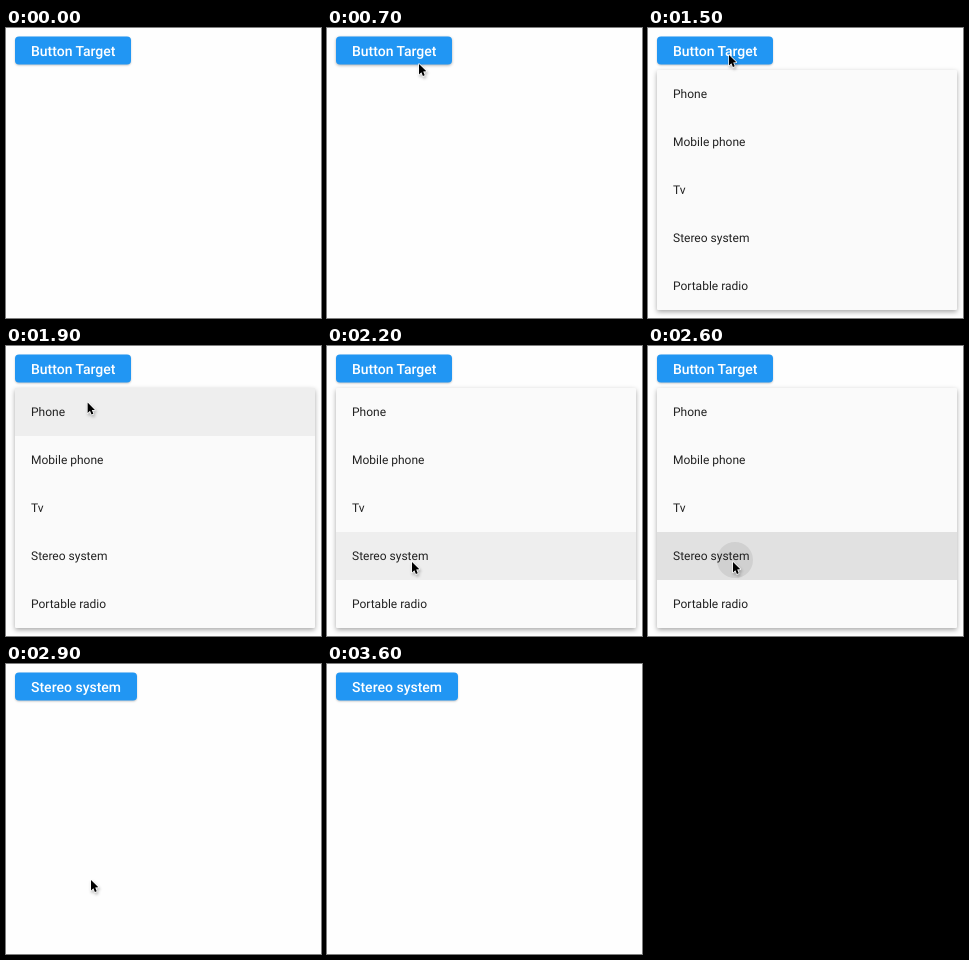
Recreate the animation shown at these times as an HTML page with a canvas. Size 315 by 290 pixels, loop 4200 ms.

```html
<!DOCTYPE html>
<html lang="en">
<head>
<meta charset="utf-8">
<title>Dropdown menu</title>
<style>
  html, body { margin: 0; width: 100%; height: 100%; overflow: hidden; background: #fefefe; }
  canvas { display: block; width: 315px; height: 290px; }
</style>
</head>
<body>
<canvas id="stage"></canvas>
<script>
const W = 315, H = 290, LOOP = 4200, STEP = 100;
const ITEMS = ['Phone', 'Mobile phone', 'Tv', 'Stereo system', 'Portable radio'];
const PICK = 3;
const PAD = 16;
const MENU = { x: 9, y: 42, w: 300, row: 48 };
const TIME = { enter: 700, open: 1500, travel: 1800, press: 2400, close: 2900, leave: 3200, gone: 3600 };
const SPOT = {
  start: { x: 92, y: 36 },
  button: { x: 81, y: 27 },
  item: { x: 85, y: 216 },
  exit: { x: 120, y: 300 }
};

const canvas = document.getElementById('stage');
const ctx = canvas.getContext('2d');
const dpr = window.devicePixelRatio || 1;
canvas.width = W * dpr;
canvas.height = H * dpr;
ctx.textRendering = 'geometricPrecision';

// Eased progress from 0 to 1 over a span of time
function progress(t, from, span) {
  const k = Math.min(1, Math.max(0, (t - from) / span));
  return k * k * (3 - 2 * k);
}

function glide(a, b, k) {
  return { x: a.x + (b.x - a.x) * k, y: a.y + (b.y - a.y) * k };
}

function cursorAt(t) {
  if (t < TIME.travel) return glide(SPOT.start, SPOT.button, progress(t, TIME.enter, 400));
  if (t < TIME.leave) return glide(SPOT.button, SPOT.item, progress(t, TIME.travel, 400));
  return glide(SPOT.item, SPOT.exit, progress(t, TIME.leave, 400));
}

function shadow(x, y, blur, alpha) {
  ctx.shadowColor = `rgba(0,0,0,${alpha})`;
  ctx.shadowOffsetX = x * dpr;
  ctx.shadowOffsetY = y * dpr;
  ctx.shadowBlur = blur * dpr;
}

function text(str, y, font, color) {
  ctx.font = font + ' Roboto, sans-serif';
  ctx.fillStyle = color;
  ctx.fillText(str, MENU.x + PAD, y);
}

function panel(x, y, w, h, r, color) {
  ctx.fillStyle = color;
  ctx.beginPath();
  ctx.roundRect(x, y, w, h, r);
  ctx.fill();
  ctx.shadowColor = 'transparent';
}

function drawButton(t, hover) {
  const picked = t >= TIME.close;
  shadow(0, 1, hover ? 3 : 2, hover ? 0.32 : 0.22);
  panel(MENU.x, 8.5, picked ? 122 : 116, 28, 4, '#2196f3');
  text(picked ? ITEMS[PICK] : 'Button Target', 27.5, '500 14px', '#fff');
}

function drawRipple(t, y) {
  const k = Math.min(1, (t - TIME.press + STEP) / (TIME.close - TIME.press));
  ctx.save();
  ctx.beginPath();
  ctx.rect(MENU.x, y, MENU.w, MENU.row);
  ctx.clip();
  ctx.fillStyle = '#d0d0d0';
  ctx.beginPath();
  ctx.arc(87, 214, 6 + 20 * k, 0, Math.PI * 2);
  ctx.fill();
  ctx.restore();
}

function drawMenu(t, cursorY) {
  const { x, y, w, row } = MENU;
  shadow(0, 2, 5, 0.34);
  panel(x, y, w, row * ITEMS.length, 1, '#fafafa');
  const active = Math.floor((cursorY - y) / row);
  if (active >= 0) {
    const top = y + active * row;
    ctx.fillStyle = t >= TIME.press ? '#e1e1e1' : '#eeeeee';
    ctx.fillRect(x, top, w, row);
    if (t >= TIME.press) drawRipple(t, top);
  }
  ITEMS.forEach((item, i) => text(item, y + i * row + 28, '400 12px', '#212121'));
}

// The arrow is symmetric about an axis tilted by an eighth of a half turn
function drawCursor({ x, y }) {
  const head = 9.6, half = head * Math.tan(Math.PI / 8), stem = 1;
  ctx.save();
  ctx.translate(x, y);
  ctx.rotate(-Math.PI / 8);
  ctx.beginPath();
  ctx.moveTo(0, 0);
  ctx.lineTo(half, head);
  ctx.lineTo(stem, head - 1);
  ctx.lineTo(stem, head + 3);
  ctx.lineTo(-stem, head + 3);
  ctx.lineTo(-stem, head - 1);
  ctx.lineTo(-half, head);
  ctx.closePath();
  shadow(1, 2, 3, 0.3);
  ctx.lineWidth = 1.4;
  ctx.lineJoin = 'round';
  ctx.strokeStyle = '#fff';
  ctx.stroke();
  ctx.shadowColor = 'transparent';
  ctx.fillStyle = '#000';
  ctx.fill();
  ctx.restore();
}

function draw(t) {
  const cursor = cursorAt(t);
  const shown = t >= TIME.enter && t < TIME.gone;
  const open = t >= TIME.open && t < TIME.close;
  ctx.setTransform(dpr, 0, 0, dpr, 0, 0);
  ctx.fillStyle = '#fefefe';
  ctx.fillRect(0, 0, W, H);
  drawButton(t, shown && !open && cursor.y < 37);
  if (open) drawMenu(t, cursor.y);
  if (shown) drawCursor(cursor);
}

const start = performance.now();
function frame() {
  const t = (performance.now() - start) % LOOP;
  draw(Math.floor(t / STEP) * STEP);
  requestAnimationFrame(frame);
}
frame();
</script>
</body>
</html>
```
